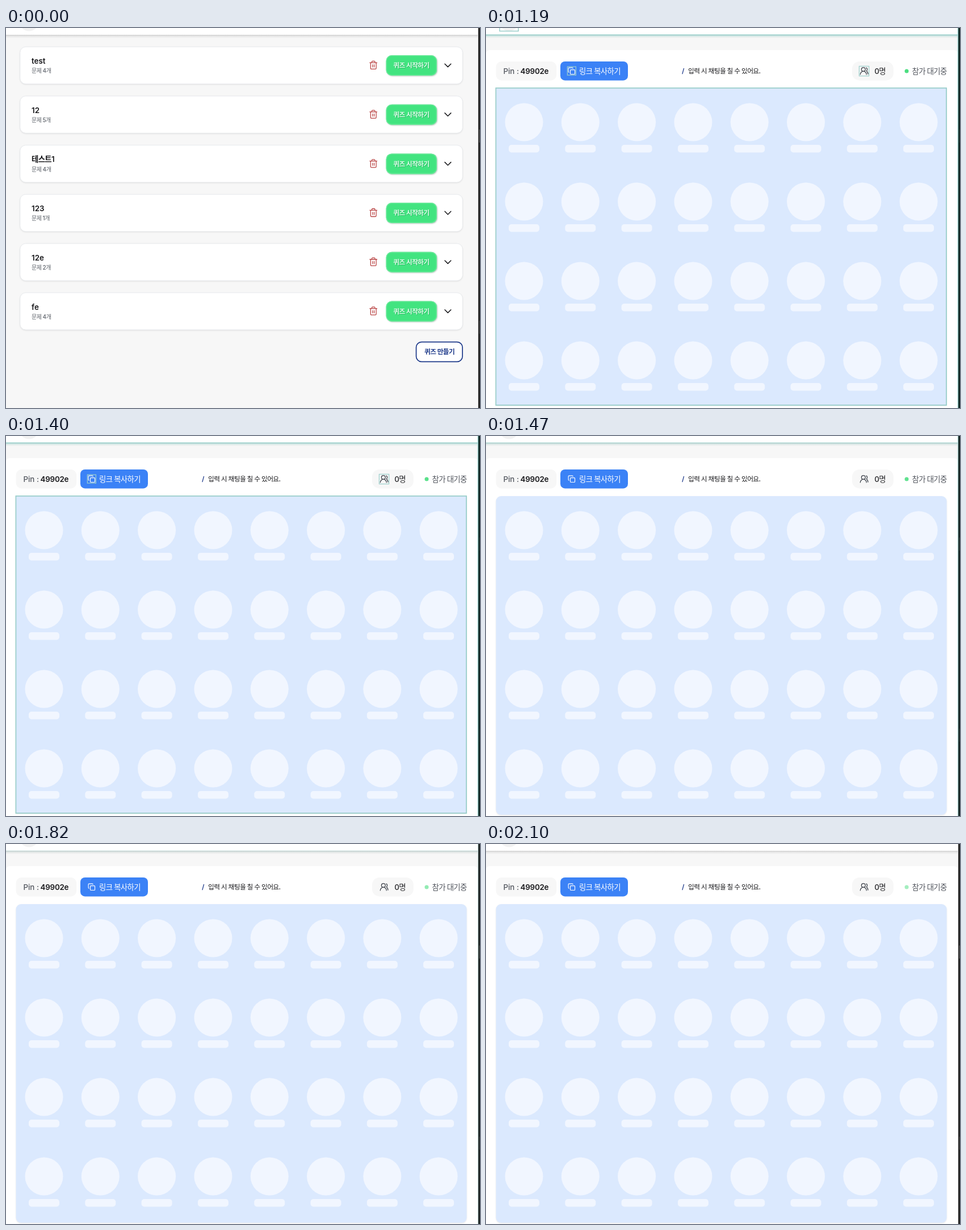
These frames come from a looping animation (835x670 px, 2170 ms). An HTML page:

```html
<!DOCTYPE html>
<html lang="ko">
<head>
<meta charset="utf-8">
<title>Quiz room</title>
<style>
  html, body { margin: 0; width: 100%; height: 100%; overflow: hidden; background: #f7f7f7; }
  svg { display: block; }
  text { font-family: Inter, "Noto Sans CJK KR", "Noto Sans CJK", sans-serif; white-space: pre; }
  .ko { letter-spacing: -.05em; }
  .icon { fill: none; stroke-linecap: round; stroke-linejoin: round; }
  .card { filter: drop-shadow(0 1px 1px rgba(0, 0, 0, .09)); }
  .start { filter: drop-shadow(1px 1px 1px rgba(40, 90, 60, .35)); }
  .start-text { filter: drop-shadow(1px 1px .5px rgba(20, 110, 60, .35)); }
</style>
</head>
<body>
<svg id="stage" width="835" height="670" viewBox="0 0 835 670">
  <defs>
    <linearGradient id="fade" x2="0" y2="1">
      <stop stop-color="#cfcfcf"/><stop offset=".4" stop-color="#e6e6e6"/><stop offset="1" stop-color="#f7f7f7"/>
    </linearGradient>
  </defs>
</svg>
<script>
const LOOP = 2170, STEP = 70, OPEN = 1120, READY = 1190, LOGO_END = 1400, SETTLE = 1470;
const TEAL = '#9bcfcb', NAVY = '#1e3a8a', BONE = '#e5e6ea';
const stage = document.getElementById('stage');

const rect = (x, y, w, h, r, fill, extra = '') =>
  `<rect x="${x}" y="${y}" width="${w}" height="${h}" rx="${r}" fill="${fill}" ${extra}/>`;
const text = (x, y, size, weight, fill, str, cls = 'ko') =>
  `<text x="${x}" y="${y}" font-size="${size}" font-weight="${weight}" fill="${fill}" class="${cls}">${str}</text>`;
const icon = (x, y, scale, color, width, body) =>
  `<g class="icon" transform="translate(${x} ${y}) scale(${scale})" stroke="${color}" stroke-width="${width}">${body}</g>`;
const frame = (x, y, w, h, width = 2) =>
  rect(x, y, w, h, 0, 'none', `stroke="${TEAL}" stroke-width="${width}"`);

function group(body) {
  const g = document.createElementNS('http://www.w3.org/2000/svg', 'g');
  g.innerHTML = body;
  return stage.appendChild(g);
}

function quizCard([title, count], i) {
  return `<g transform="translate(0 ${i * 86.7})">
    ${rect(24.8, 33.3, 779.5, 65.3, 10, '#fff', 'stroke="#e5e7eb" stroke-width=".8" class="card"')}
    ${text(45, 63, 13.4, 600, '#18181b', title, /[a-z0-9]$/.test(title) && title.charCodeAt(0) < 128 ? '' : 'ko')}
    ${text(45, 79.4, 10, 500, '#5b6068', `문제 ${count}개`)}
    ${icon(638.8, 57, .7, '#b94343', 1.8,
      '<path d="M3 6h18M19 6v14a2 2 0 0 1-2 2H7a2 2 0 0 1-2-2V6M8 6V4a2 2 0 0 1 2-2h4a2 2 0 0 1 2 2v2M10 11v6M14 11v6"/>')}
    ${rect(669.5, 48, 89.5, 36, 10, '#42e480', 'class="start"')}
    ${rect(670.3, 48.8, 87.9, 34.4, 9.2, 'none', 'stroke="#72eba0" stroke-width="1.6" opacity=".7"')}
    ${text(682.3, 70.2, 11.7, 600, '#dcfce8', '퀴즈 시작하기', 'ko start-text')}
    ${icon(773, 63.2, 1, '#18181b', 1.5, '<path d="M0 0l5.4 5.4L10.8 0"/>')}
  </g>`;
}

function seats(fill) {
  let out = '';
  for (let i = 0; i < 32; i++) {
    const x = 67 + i % 8 * 99.3, y = 166 + (i >> 3) * 140;
    out += `<circle cx="${x}" cy="${y}" r="33.5" fill="${fill}"/>` + rect(x - 27, y + 40, 54, 13.4, 5, fill);
  }
  return out;
}

group(rect(0, 0, 835, 670, 0, '#f7f7f7'));

const list = group(
  [['test', 4], ['12', 5], ['테스트1', 4], ['123', 1], ['12e', 2], ['fe', 4]].map(quizCard).join('') +
  rect(722.6, 553.6, 81.5, 34.8, 9.5, '#fff', `stroke="${NAVY}" stroke-width="1.7"`) +
  text(737, 575, 11.7, 600, NAVY, '퀴즈 만들기'));

const room = group(rect(0, 39, 831, 645, 6, '#fff'));

const skeleton = group(
  rect(18, 59, 106.3, 33.4, 9, BONE) + rect(131, 59, 106.5, 33.4, 9, BONE) +
  rect(308.5, 66, 213, 20, 3.5, '#f6f6f7') + rect(605, 59, 80, 33.4, 12, BONE) +
  rect(705, 59, 107, 33.4, 4, BONE) +
  rect(17.8, 106, 793.8, 560.5, 9, '#fff', 'class="card"') +
  rect(10, 100, 810, 14, 0, '#fff') + seats(BONE));

const lobby = group(
  rect(17.5, 59, 106.8, 33.4, 10, '#f7f7f7') +
  text(30.4, 80.6, 13.4, 500, '#52565e', 'Pin :', '') +
  `<g letter-spacing="-.015em">${text(60.6, 80.6, 13.4, 600, '#18181b', '49902e', '')}</g>` +
  rect(131, 59, 119, 33.4, 8, '#3b82f6') +
  icon(144, 69, .57, '#fff', 2,
    '<rect x="8" y="8" width="14" height="14" rx="2"/><path d="M4 16a2 2 0 0 1-2-2V4c0-1.100.9-2 2-2h10a2 2 0 0 1 2 2"/>') +
  text(164, 80.6, 13.4, 500, '#fff', '링크 복사하기') +
  text(345, 80, 11.7, 600, NAVY, '/', '') +
  text(356, 80, 11.7, 500, '#18181b', '입력 시 채팅을 칠 수 있어요.') +
  rect(645, 59, 72.8, 33.4, 13, '#f7f7f7') +
  icon(658, 67.6, .68, '#3f444c', 1.9,
    '<path d="M18 21a8 8 0 0 0-16 0"/><circle cx="10" cy="8" r="5"/><path d="M22 20c0-3.37-2-6.5-4-8a5 5 0 0 0-.45-8.3"/>') +
  text(684.3, 80.6, 13.4, 500, '#27272a', '0명') +
  '<circle id="dot" cx="741" cy="76" r="3.5" fill="#4ade80"/>' +
  text(750.5, 80.6, 13.4, 500, '#52565e', '참가 대기중') +
  rect(17.6, 106, 794, 561.8, 9, '#dbe9fe', 'id="panel" class="card"') +
  seats('#f1f6ff'));

const dot = document.getElementById('dot'), panel = document.getElementById('panel');

const paintMarks = group(
  frame(17.4, 105.8, 793.6, 559.2, 1.8) + frame(143.4, 68.2, 15, 15, 1.2) + frame(657.4, 67.4, 17.2, 17.2, 1.2));

group(
  rect(0, 12, 832, 6, 0, 'url(#fade)') + rect(0, 0, 832, 12, 0, '#fff') +
  '<ellipse cx="40.5" cy="-7" rx="15" ry="12.5" fill="#f2f2f2"/>' +
  rect(831, 0, 1, 670, 0, '#d9d9d9') + rect(832, 0, 3, 670, 0, '#262626') +
  rect(833, 179, 2, 23, 0, '#464646') + rect(833, 516, 2, 23, 0, '#383838'));

const logoMark = group(frame(24, -6, 33, 11.5, 1.5));
const edgeMark = group(
  rect(0, 11.4, 832, 2.2, 0, TEAL) + rect(0, 13.6, 832, 2.4, 0, '#dcecea') +
  rect(830.6, 0, 1.6, 670, 0, TEAL) + rect(832.2, 0, 2.8, 670, 0, '#0b2b27', 'opacity=".75"'));

const show = (el, on) => el.style.display = on ? '' : 'none';

// Ease of cubic-bezier(.4, 0, .6, 1), found by bisection.
function ease(x) {
  let lo = 0, hi = 1;
  for (let i = 0; i < 20; i++) {
    const u = (lo + hi) / 2, v = 1 - u;
    if (1.2 * v * v * u + 1.8 * v * u * u + u ** 3 < x) lo = u; else hi = u;
  }
  return 3 * lo * lo - 2 * lo ** 3;
}

function draw(now) {
  const t = Math.floor(now % LOOP / STEP) * STEP;
  const ready = t >= READY, marked = ready && t < SETTLE;
  show(list, t < OPEN);
  show(room, t >= OPEN);
  show(skeleton, t >= OPEN && !ready);
  show(lobby, ready);
  show(paintMarks, marked);
  show(logoMark, t >= OPEN && t < LOGO_END);
  panel.setAttribute('height', marked ? 559 : 561.8);
  panel.setAttribute('rx', marked ? 0 : 9);
  dot.setAttribute('opacity', 1 - .5 * ease(Math.max(0, Math.min(1, (t - READY + 70) / 1000))));
  const fade = t < SETTLE ? 1 : .7 * (2100 - t) / (2100 - SETTLE);
  edgeMark.setAttribute('opacity', t < OPEN ? 0 : Math.max(0, fade));
  requestAnimationFrame(() => draw(performance.now() - start));
}
const start = performance.now();
draw(0);
</script>
</body>
</html>
```
